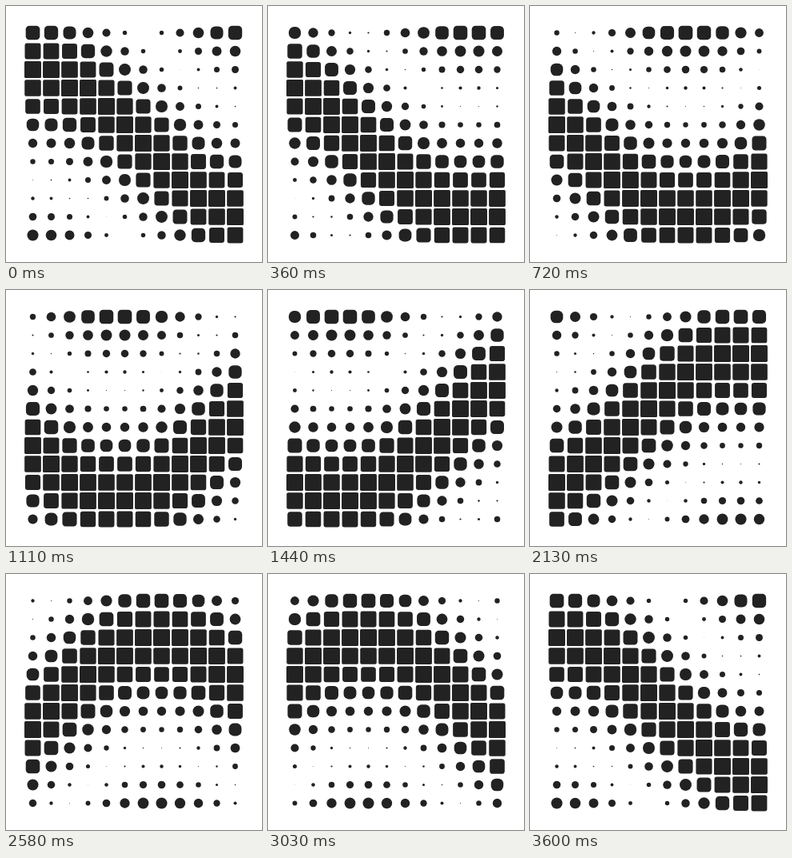
An HTML page with a canvas that plays this animation: 320x320 px, repeating every 3.63 s.

```html
<!DOCTYPE html>
<html>
<head>
<meta charset="utf-8">
<style>
  html, body { margin: 0; width: 100%; height: 100%; overflow: hidden; background: #fff; }
  canvas { display: block; width: 320px; height: 320px; }
</style>
</head>
<body>
<canvas id="stage" width="320" height="320"></canvas>
<script>
const ctx = document.getElementById('stage').getContext('2d');
const COUNT = 12, SPACING = 23, FIRST = 33.5, MAX_SIZE = 21;
const STEP = 30, STEPS = 121;

// Small tiles are discs; corners sharpen as a tile grows.
function drawTile(x, y, level) {
  const size = MAX_SIZE * level;
  const radius = Math.min(size / 2, 1.5 + 19 * (1 - level));
  ctx.beginPath();
  ctx.roundRect(x - size / 2, y - size / 2, size, size, radius);
  ctx.fill();
}

function draw(time) {
  const step = Math.floor(time / STEP) % STEPS;
  const turn = 2 * Math.PI * step / (STEPS - 1);
  ctx.fillStyle = '#fff';
  ctx.fillRect(0, 0, 320, 320);
  ctx.fillStyle = '#222';
  for (let col = 0; col < COUNT; col++) {
    const shift = Math.cos(Math.PI * col / COUNT + turn);
    for (let row = 0; row < COUNT; row++) {
      const level = Math.abs(Math.sin(Math.PI * row / COUNT + shift));
      drawTile(FIRST + col * SPACING, FIRST + row * SPACING, level);
    }
  }
}

const start = performance.now();
function tick() {
  draw(performance.now() - start);
  requestAnimationFrame(tick);
}
draw(0);
requestAnimationFrame(tick);
</script>
</body>
</html>
```
